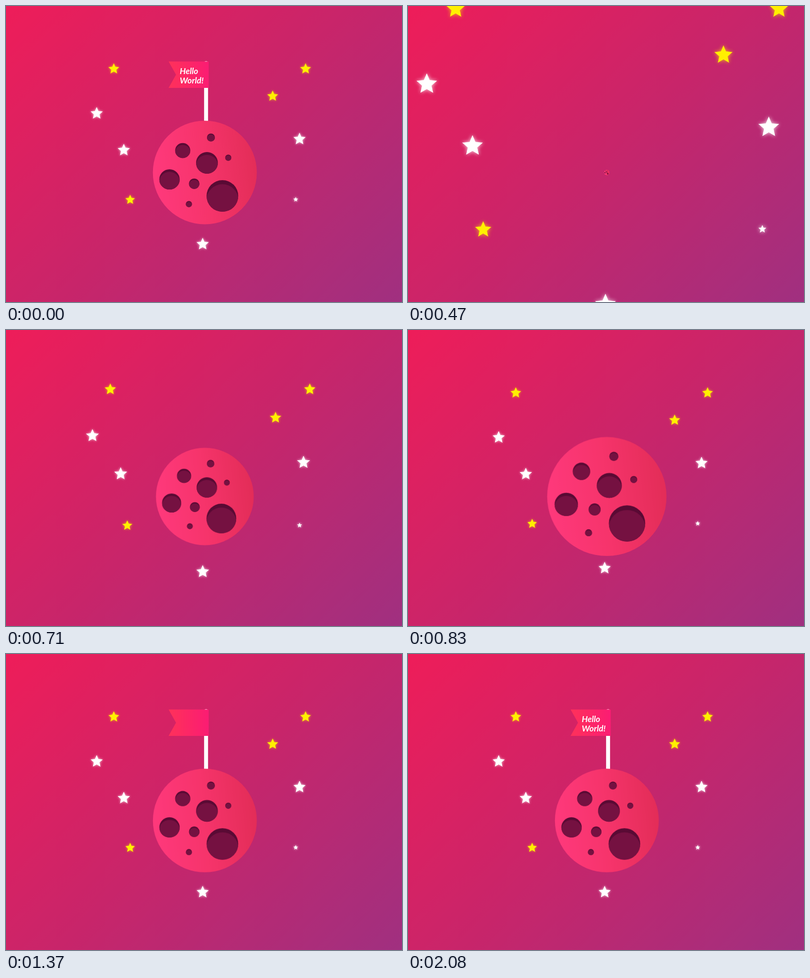
An HTML page for the animation above (4080 ms loop, 800 by 600 pixels).

```html
<!DOCTYPE html>
<html lang="en">
<head>
<meta charset="utf-8">
<title>Hello World</title>
<style>
  html, body { margin: 0; width: 100%; height: 100%; overflow: hidden; background: #c6266c; }
  svg { display: block; width: 100vw; height: 100vh; }

  #stars, #moon, #pole, #flag, #label {
    animation: 4080ms infinite;
    animation-timing-function: cubic-bezier(.333, 0, .667, 1);
  }
  #stars { transform-origin: 395px 304.6px; animation-name: zoom; }
  #moon  { transform-origin: 401.7px 337.5px; animation-name: pop; }
  #pole  { animation-name: rise; }
  #flag  { transform-origin: 409.5px 139px; animation-name: unfold; }
  #label { animation-name: fade; font: italic 700 17px Lato, sans-serif; fill: #fff; }

  .white  { fill: #fff; filter: drop-shadow(0 0 2.5px rgba(255, 255, 255, .85)); }
  .yellow { fill: #fff000; filter: drop-shadow(0 0 2.5px rgba(255, 225, 0, .8)); }

  @keyframes zoom {
    0%, 4.9% { transform: scale(1); }
    4.902% { transform: scale(2.75); animation-timing-function: cubic-bezier(.167, .167, .667, 1); }
    18.873%, 100% { transform: scale(1); }
  }
  @keyframes pop {
    0%, 4.9% { transform: scale(1); }
    4.902%, 10.294% { transform: scale(0); }
    20.098% { transform: scale(1.15); }
    24.02%, 100% { transform: scale(1); }
  }
  @keyframes rise {
    0%, 4.9% { transform: none; opacity: 1; }
    4.902%, 21.568% { transform: translateY(130px); opacity: 0; }
    21.569% { transform: translateY(130px); opacity: 1; }
    30.637%, 100% { transform: translateY(0); opacity: 1; }
  }
  @keyframes unfold {
    0%, 4.9% { transform: scaleX(1); }
    4.902%, 30.637% { transform: scaleX(0); }
    33.578%, 100% { transform: scaleX(1); }
  }
  @keyframes fade {
    0%, 4.9% { opacity: 1; }
    4.902%, 45.098% { opacity: 0; animation-timing-function: linear; }
    50.98%, 100% { opacity: 1; }
  }
</style>
</head>
<body>
<svg viewBox="0 0 800 600" preserveAspectRatio="none">
  <defs>
    <linearGradient id="sky" gradientUnits="userSpaceOnUse" x1="0" y1="0" x2="700" y2="700">
      <stop offset="0" stop-color="#ee1d59"/>
      <stop offset=".5" stop-color="#c8256a"/>
      <stop offset="1" stop-color="#a03080"/>
    </linearGradient>
    <linearGradient id="rock" x1="0" y1=".55" x2="1" y2=".45">
      <stop offset="0" stop-color="#ff397c"/>
      <stop offset=".5" stop-color="#f6346b"/>
      <stop offset="1" stop-color="#e32d58"/>
    </linearGradient>
    <linearGradient id="cloth">
      <stop offset="0" stop-color="#ff315a"/>
      <stop offset="1" stop-color="#fb1c73"/>
    </linearGradient>
    <clipPath id="rim"><circle r="1"/></clipPath>
    <g id="crater">
      <circle r="1" fill="#590a34"/>
      <circle r="1" cy=".27" fill="#751141" clip-path="url(#rim)" style="clip-path:none" visibility="hidden"/>
      <g clip-path="url(#rim)"><circle r="1.02" cy=".28" fill="#751141"/></g>
    </g>
  </defs>

  <rect width="800" height="600" fill="url(#sky)"/>
  <g id="stars"></g>
  <rect id="pole" x="400.2" y="111.7" width="8" height="140" rx="4" fill="#fff"/>
  <g id="moon"><circle cx="401.7" cy="337.5" r="105" fill="url(#rock)"/></g>
  <path id="flag" d="M328.5 112.5H409.5V166H328.5L343.5 139.2Z" fill="url(#cloth)"/>
  <g id="label">
    <text x="351" y="138">Hello</text>
    <text x="351" y="156.5">World!</text>
  </g>
</svg>
<script>
  // x, y, radius
  const whiteStars = [[183.2, 217.8, 13], [238, 292.2, 13], [593, 269.8, 13], [585.3, 392.2, 5], [397.3, 482.8, 13]];
  const yellowStars = [[217.8, 127.5, 11.5], [605.2, 127.5, 11.5], [538.7, 182.8, 11.5], [250.8, 392.8, 10.2]];
  const craters = [
    [357, 293, 15.3], [414, 266.5, 8], [406, 318, 22], [449, 307.5, 6.2],
    [330.3, 351.5, 20.6], [380.2, 360.3, 10.6], [437.2, 385, 32], [369.5, 401.5, 6.2]
  ];

  function add(parent, tag, attrs) {
    const node = document.createElementNS("http://www.w3.org/2000/svg", tag);
    for (const name in attrs) node.setAttribute(name, attrs[name]);
    document.getElementById(parent).append(node);
  }

  function starPoints(x, y, radius) {
    return Array.from({ length: 10 }, (_, i) => {
      const r = i % 2 ? radius * 0.46 : radius;
      const angle = i * Math.PI / 5;
      return [x + r * Math.sin(angle), y - r * Math.cos(angle)];
    }).join(" ");
  }

  for (const star of whiteStars) add("stars", "polygon", { class: "white", points: starPoints(...star) });
  for (const star of yellowStars) add("stars", "polygon", { class: "yellow", points: starPoints(...star) });
  for (const [x, y, r] of craters) {
    add("moon", "use", { href: "#crater", transform: `translate(${x} ${y}) scale(${r})` });
  }
</script>
</body>
</html>
```
